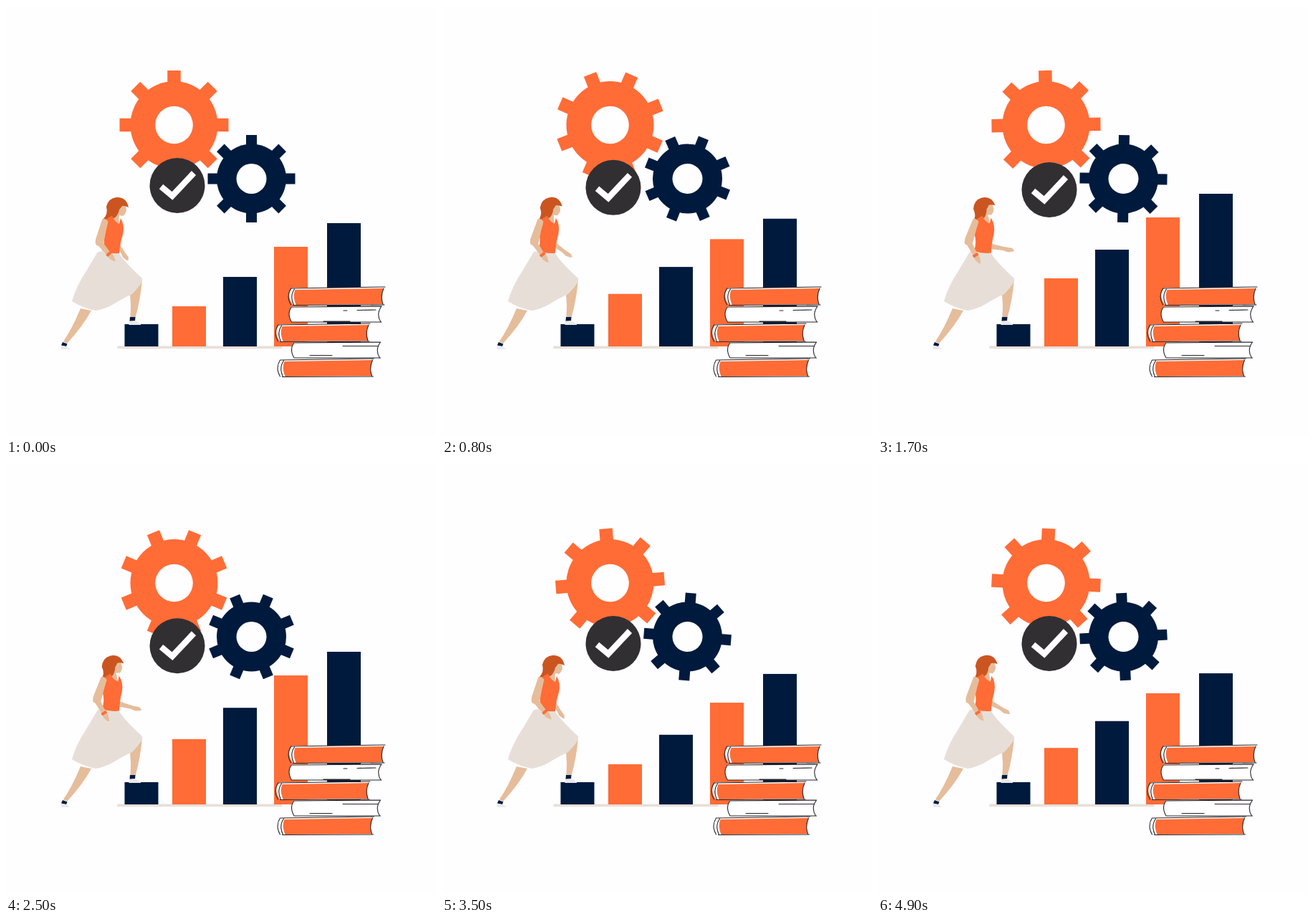
An HTML page for the animation above (5000 ms loop, 600 by 600 pixels).

```html
<!DOCTYPE html>
<html lang="en">
<head>
<meta charset="utf-8">
<title>Growth steps</title>
<style>
  html, body { margin: 0; width: 100%; height: 100%; overflow: hidden; background: #fefdff; }
  svg { display: block; width: 100vw; height: 100vh; }
  .orange { fill: #ff6c36; }
  .navy { fill: #001a3d; }
  .skin { fill: #e5bd9b; }
  .hair { fill: #cb5520; }
  .cloth { fill: #e7dfd7; }
  .white { fill: #fff; }
  .ink { fill: none; stroke: #29262a; stroke-width: 1.1; stroke-linecap: round; }
</style>
</head>
<body>
<svg viewBox="0 0 600 600">
  <g id="gears"></g>
  <g id="badge">
    <circle cx="239" cy="250.5" r="38.5" fill="#322f32"/>
    <path d="M216.5 252L232 265L262 233" fill="none" stroke="#fff" stroke-width="8.5"/>
  </g>

  <rect class="cloth" x="155.5" y="474.5" width="230" height="3.6"/>
  <g id="bars"></g>
  <g id="books"></g>

  <g id="woman">
    <path class="skin" d="M104 422L119 425Q108 446 85 471L80 468Q92 451 104 422Z"/>
    <path class="navy" d="M79 469L85.500 471.500L84 475L77 473.500Z"/>
    <path d="M76.500 473.500L84 475L90 478.500L77 479Z" fill="#ebe8ea"/>
    <path class="skin" d="M190 382Q188 408 180.500 435H173.500Q175 418 173 401Z"/>
    <path class="navy" d="M173 434H180.500L180 440H172.500Z"/>
    <path d="M172 439.500L180 439L188 443.500V445H171.500Z" fill="#ebe8ea"/>
    <path class="cloth" d="M128 343Q143 340 158 345Q164 356 190 380V385Q184 394 176 402Q161 409 150 416Q138 423 125 425Q106 421 92 412Q98 391 112 370Z"/>
    <g id="farArm">
      <path class="skin" d="M-2 -4L8 -3L20 -2.500L30 -3L34 0L32 1.500L26 3.500L18 2.500L0 4Z"/>
    </g>
    <g id="torso">
      <g id="head">
        <path class="skin" d="M150 285L163 277L167 279L168 285Q167 290 163 293L158 292L157 303L149 300Z"/>
        <path class="hair" d="M135 298Q143 291 140 280Q143 268 154 267Q168 266 171 281Q164 278 162 279Q160 282 158 284Q157 292 149 298Q142 300 135 298Z"/>
      </g>
      <path class="skin" d="M148 296L157 295L158 307L150 303Z"/>
      <path class="orange" d="M137 299L148 292.500Q151 301 158 304L160 296Q166 306 163 319Q159 331 158 345Q145 346 134 341Q139 330 136 318Z"/>
    </g>
    <g id="upperArm">
      <path class="skin" d="M-4 -4Q1 -5 4 0L1 13L-2 29Q-6 37 -13 32Q-15 28 -12 20Z"/>
      <g id="foreArm">
        <path class="skin" d="M-4 3L0 -5L18 -3L25 -3.500L33 0L31 2L25 4L17 3Z"/>
        <path class="orange" d="M17 -4H21V4H17Z"/>
      </g>
    </g>
  </g>
</svg>
<script>
const LOOP = 5000, CYCLE = 4000, FRAME = 100, MOVE = 1100;
const $ = id => document.getElementById(id);
const mix = (a, b, p) => a + (b - a) * p;

function add(parent, tag, attrs) {
  const node = document.createElementNS("http://www.w3.org/2000/svg", tag);
  for (const key in attrs) node.setAttribute(key, attrs[key]);
  parent.appendChild(node);
  return node;
}

function makeGear(x, y, body, hole, reach, tooth, color) {
  const gear = add($("gears"), "g", { class: color });
  for (let i = 0; i < 8; i++) {
    add(gear, "rect", { x: -tooth / 2, y: -reach, width: tooth, height: reach - body + 6, transform: `rotate(${i * 45})` });
  }
  add(gear, "circle", { r: body });
  add(gear, "circle", { r: hole, fill: "#fefdff" });
  return angle => gear.setAttribute("transform", `translate(${x} ${y}) rotate(${angle})`);
}

const turnLarge = makeGear(234.5, 166, 61, 26.3, 76, 18.5, "orange");
const turnSmall = makeGear(342.5, 241, 48.5, 21, 61, 15, "navy");

add($("bars"), "rect", { class: "navy", x: 165.5, y: 444, width: 47, height: 31 });
const bars = [
  { x: 232, low: 419, high: 380, rise: 290, fall: 2275, color: "orange" },
  { x: 303, low: 378, high: 340, rise: 345, fall: 2450, color: "navy" },
  { x: 374, low: 336, high: 295, rise: 425, fall: 2590, color: "orange" },
  { x: 448, low: 303, high: 262, rise: 520, fall: 2763, color: "navy" }
];
for (const bar of bars) bar.node = add($("bars"), "rect", { class: bar.color, x: bar.x, width: 47 });

function shape(cls, d) { add($("books"), "path", { class: cls, d }); }

function orangeBook(x, y, end) {
  const h = 24, left = x + 8;
  shape("white", `M${x + 5} ${y}H${end}V${y + h}H${x + 6}Q${x - 4} ${y + h / 2} ${x + 5} ${y}Z`);
  shape("orange", `M${left + 1} ${y + 3}L${end - 1} ${y + 1}Q${end - 6} ${y + 12} ${end - 2} ${y + h - 1}L${left + 2} ${y + h}Q${left - 3} ${y + 12} ${left + 1} ${y + 3}Z`);
  shape("ink", `M${x + 3} ${y + 1}Q${x - 4} ${y + 12} ${x + 3} ${y + h}
    M${x + 8} ${y + 2}Q${x + 1} ${y + 12} ${x + 7} ${y + h}
    M${x + 4} ${y + 1}L${end + 1} ${y - 1}M${x + 6} ${y + h + 0.5}L${end} ${y + h}
    M${end - 1} ${y + 1}Q${end - 6} ${y + 12} ${end - 2} ${y + h - 1}`);
}

function whiteBook(x, y, end, marks) {
  const h = 22;
  shape("white", `M${x + 4} ${y}H${end}Q${end - 7} ${y + 11} ${end} ${y + h}H${x + 4}Q${x - 3} ${y + 11} ${x + 4} ${y}Z`);
  shape("ink", `M${end} ${y}L${x + 4} ${y + 1}Q${x - 3} ${y + 10} ${x + 4} ${y + h}L${end} ${y + h}
    M${end} ${y}Q${end - 8} ${y + 11} ${end - 1} ${y + h}${marks}`);
}

whiteBook(394.5, 419, 524, "M443 440H480M490 424.500L516 424M471 425H476");
whiteBook(398, 469, 522.5, "M424 487.500H455M470 474.500H519");
orangeBook(394.5, 393, 528);
orangeBook(376.5, 444, 507);
orangeBook(379.5, 493, 512.5);

function ease(time, start, length) {
  const p = Math.min(1, Math.max(0, (time - start) / length));
  return (1 - Math.cos(Math.PI * p)) / 2;
}

const swing = (time, rise, fall) => ease(time, rise, MOVE) - ease(time, fall, MOVE);

function poseWoman(p) {
  const place = (id, value) => $(id).setAttribute("transform", value);
  place("torso", `rotate(${-3 * p} 147 344)`);
  place("head", `translate(${-p} ${p}) rotate(${-9 * p} 150 298)`);
  place("upperArm", `translate(${mix(138.5, 136.5, p)} 301) rotate(${4 * p})`);
  place("foreArm", `translate(-8 31) rotate(${mix(47, 55, p)})`);
  place("farArm", `translate(${mix(152, 157, p)} ${mix(327, 335, p)}) rotate(${mix(57, 11, p)})`);
}

function draw(time) {
  const angle = time * 0.027;
  turnLarge(-angle);
  turnSmall(angle);

  const drop = 6 * (ease(time, 0, 1650) - ease(time, 1700, 1700));
  $("badge").setAttribute("transform", `translate(0 ${drop})`);

  const phase = time % CYCLE;
  for (const bar of bars) {
    const top = mix(bar.low, bar.high, swing(phase, bar.rise, bar.fall));
    bar.node.setAttribute("y", top);
    bar.node.setAttribute("height", 475 - top);
  }
  poseWoman(swing(phase, 290, 2275));
}

const begin = performance.now();
function tick() {
  const time = (performance.now() - begin) % LOOP;
  draw(Math.floor(time / FRAME) * FRAME);
  requestAnimationFrame(tick);
}
tick();
</script>
</body>
</html>
```
